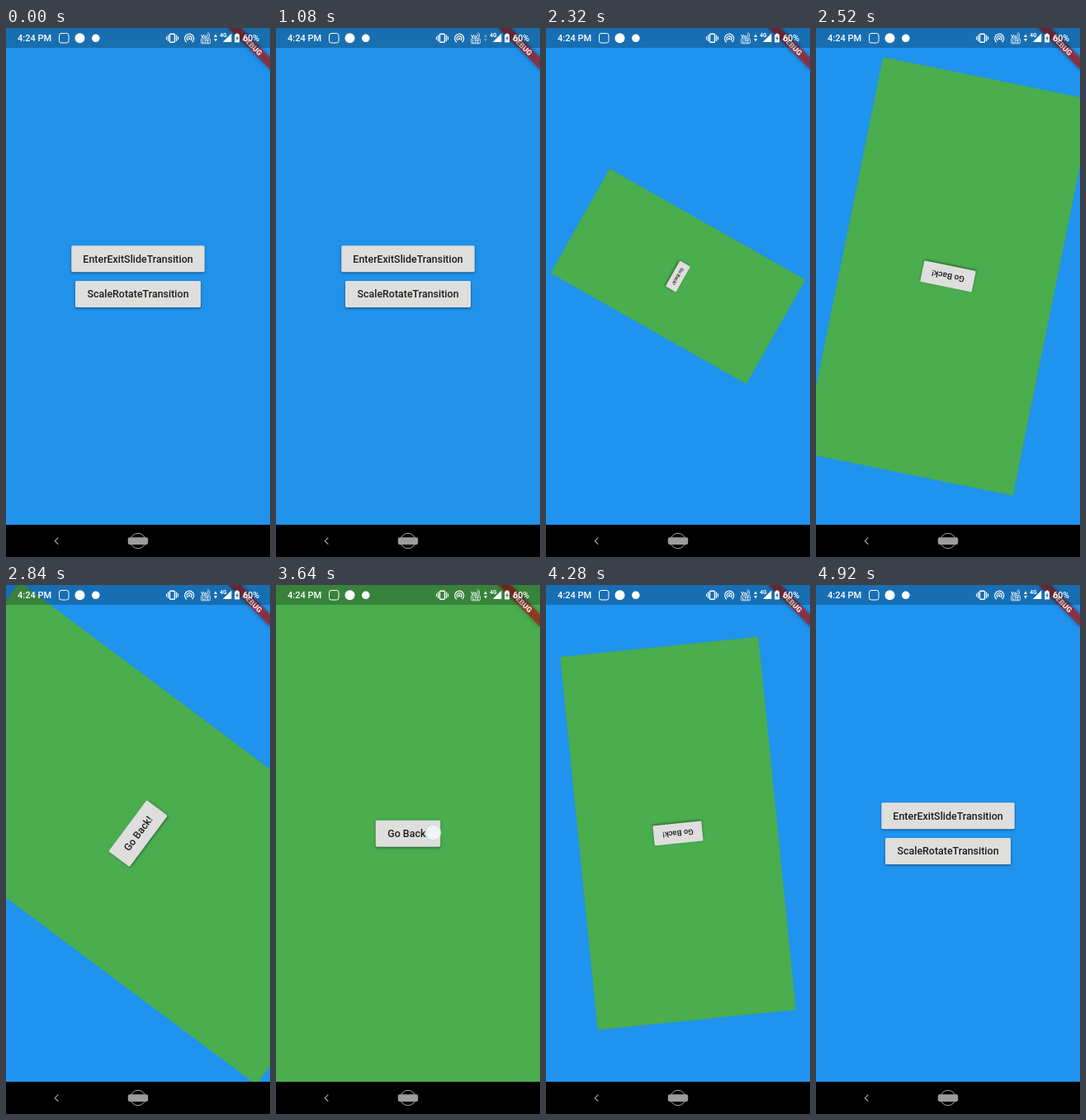
Recreate the animation shown at these times as an HTML page with a canvas. Size 320x640 px, loop 5 s.

```html
<!DOCTYPE html>
<html lang="en">
<head>
<meta charset="utf-8">
<title>Scale and rotate page transition</title>
<style>
html, body { margin: 0; height: 100%; overflow: hidden; background: #000; }
canvas { display: block; }
</style>
</head>
<body>
<canvas id="stage" width="320" height="640"></canvas>
<script>
const ctx = document.getElementById('stage').getContext('2d');
const LOOP = 5000, STEP = 40, SPIN = 1000;
const PUSH = 1988, POP = 3764;
const W = 320, H = 601, CX = 160, CY = 300.5;
const TAU = Math.PI * 2;
const clamp = v => Math.min(1, Math.max(0, v));

// cubic-bezier(.4, 0, .2, 1)
function ease(x) {
  if (x <= 0 || x >= 1) return clamp(x);
  let lo = 0, hi = 1;
  for (let i = 0; i < 24; i++) {
    const s = (lo + hi) / 2, r = 1 - s;
    if (1.2 * r * r * s + 0.6 * r * s * s + s * s * s < x) lo = s; else hi = s;
  }
  return 3 * lo * lo - 2 * lo * lo * lo;
}

function rect(x, y, w, h, color) {
  ctx.fillStyle = color;
  ctx.fillRect(x, y, w, h);
}

function roundRect(x, y, w, h, r) {
  ctx.beginPath();
  ctx.roundRect(x, y, w, h, r);
}

function disc(x, y, r, color) {
  ctx.fillStyle = color;
  ctx.beginPath();
  ctx.arc(x, y, r, 0, TAU);
  ctx.fill();
}

function arc(x, y, r, from = 0, to = TAU) {
  ctx.beginPath();
  ctx.arc(x, y, r, from, to);
  ctx.stroke();
}

function shape(points, close = true) {
  ctx.beginPath();
  points.forEach(([x, y]) => ctx.lineTo(x, y));
  if (close) ctx.fill(); else ctx.stroke();
}

function text(str, x, y, size, weight, color, align = 'left') {
  ctx.font = `${weight} ${size}px Roboto, sans-serif`;
  ctx.textAlign = align;
  ctx.fillStyle = color;
  ctx.fillText(str, x, y);
}

// sinceTap: ms since the finger left the button
function button(label, cx, cy, w, angle, sinceTap, tapX) {
  const x = cx - w / 2, y = cy - 16;
  ctx.save();
  ctx.shadowColor = 'rgba(0,0,0,.42)';
  ctx.shadowBlur = 3;
  ctx.shadowOffsetX = -1.3 * Math.sin(angle);
  ctx.shadowOffsetY = 1.3 * Math.cos(angle);
  roundRect(x, y, w, 32, 1.8);
  ctx.fillStyle = '#dededd';
  ctx.fill();
  ctx.restore();
  if (sinceTap > 0 && sinceTap < 200) {
    const fade = 1 - sinceTap / 200;
    ctx.save();
    roundRect(x, y, w, 32, 1.8);
    ctx.clip();
    rect(x, y, w, 32, `rgba(188,188,188,${0.25 * fade})`);
    disc(tapX, cy, sinceTap * 0.9, `rgba(200,200,200,${0.4 * fade})`);
    ctx.restore();
  }
  text(label, cx, cy + 4.4, 12.44, 500, '#1e1e1e', 'center');
}

function greenPage(v, t) {
  const s = ease(v), angle = v * TAU;
  if (s <= 0) return;
  ctx.save();
  ctx.beginPath();
  ctx.rect(0, 0, W, H);
  ctx.clip();
  ctx.translate(CX, CY);
  ctx.rotate(angle);
  ctx.scale(s, s);
  ctx.translate(-CX, -CY);
  rect(0, 0, W, H, '#4aad4e');
  button('Go Back!', CX, CY + 0.2, 78.5, angle, t - POP, 191);
  ctx.restore();
}

function banner() {
  ctx.save();
  ctx.translate(W, 0);
  ctx.rotate(Math.PI / 4);
  ctx.shadowColor = 'rgba(0,0,0,.5)';
  ctx.shadowBlur = 5;
  rect(-36, 24.9, 72, 10.7, 'rgba(183,28,28,.68)');
  ctx.shadowBlur = 0;
  text('DEBUG', 0, 33.5, 9.07, 900, '#f4eaea', 'center');
  ctx.restore();
}

function statusBar(t) {
  const white = '#fff';
  rect(0, 0, W, 24, 'rgba(0,0,0,.25)');
  text('4:24 PM', 14, 16.3, 11, 500, white);
  ctx.strokeStyle = white;
  ctx.lineWidth = 1;
  roundRect(64.5, 6.5, 11.5, 11.5, 2.5);
  ctx.stroke();
  disc(89.5, 12.2, 6, white);
  disc(108.8, 12.3, 4.8, white);

  // vibrate
  ctx.lineWidth = 1.4;
  roundRect(198.5, 7.3, 6, 10, 1);
  ctx.stroke();
  rect(196, 8.5, 1.2, 7.5, white);
  rect(206, 8.5, 1.2, 7.5, white);
  rect(194, 10.3, 1.1, 4, white);
  rect(208, 10.3, 1.1, 4, white);

  // hotspot
  ctx.lineWidth = 1.2;
  arc(222.2, 12.7, 5.5, 2.2, 7.2);
  arc(222.2, 12.7, 3, 2.2, 7.2);
  disc(222.2, 12.9, 1.4, white);

  // call over data
  text('Vo', 236.3, 11.6, 6, 700, white);
  ctx.lineWidth = 0.8;
  arc(242, 9, 2.6, -1, 1);
  arc(242, 9, 4.6, -1, 1);
  roundRect(236.6, 12.8, 10.8, 6, 1);
  ctx.stroke();
  text('LTE', 242, 17.7, 5, 700, white, 'center');

  // data arrows, dim while idle
  ctx.fillStyle = t >= 1080 && t < 2080 ? 'rgba(255,255,255,.35)' : white;
  shape([[252, 11], [254, 7.5], [256, 11]]);
  shape([[252, 13], [254, 16.5], [256, 13]]);

  text('4G', 259.3, 11, 6.5, 700, white);
  shape([[273.3, 6.5], [273.3, 17], [262.8, 17]]);
  rect(278.7, 6.6, 2.8, 1.5, white);
  rect(277.2, 7.8, 5.8, 9.6, white);
  ctx.fillStyle = '#3a6d9c';
  shape([[280.8, 9], [278.3, 13], [279.8, 13], [279.5, 16], [282, 12], [280.5, 12]]);
  text('60%', 287.3, 16.2, 10.6, 500, white);
}

function navBar() {
  rect(0, H, W, 640 - H, '#000');
  ctx.lineWidth = 1.2;
  ctx.strokeStyle = '#a5a5a5';
  shape([[63.3, 616.7], [59.3, 620.7], [63.3, 624.7]], false);
  ctx.lineWidth = 1;
  arc(160, 620.5, 9.2);
  roundRect(147.8, 616.3, 24.4, 8.6, 2.2);
  ctx.fillStyle = '#9c9c9c';
  ctx.fill();
}

function touch(x, y, alpha) {
  ctx.save();
  ctx.globalAlpha = alpha;
  disc(x, y, 10, 'rgba(190,215,225,.7)');
  disc(x, y, 9, '#f1f5f6');
  ctx.restore();
}

function draw(t) {
  rect(0, 0, W, H, t < PUSH ? '#2092e9' : '#1f93ee');
  button('EnterExitSlideTransition', CX, 279.3, 161.5, 0, -1, 0);
  button('ScaleRotateTransition', CX, 322, 152, 0, t - PUSH, 212);
  greenPage(clamp(t < POP ? (t - PUSH) / SPIN : 1 - (t - POP) / SPIN), t);
  banner();
  statusBar(t);
  navBar();
  if (t >= 1840 && t < PUSH) touch(211.5, 323.5, t < 1880 ? 0.6 : 0.9);
  if (t >= 3640 && t < POP) touch(190.5, 299.5, 0.95);
}

function frame() {
  const t = performance.now() % LOOP;
  draw(Math.floor(t / STEP) * STEP);
  requestAnimationFrame(frame);
}
frame();
</script>
</body>
</html>
```
